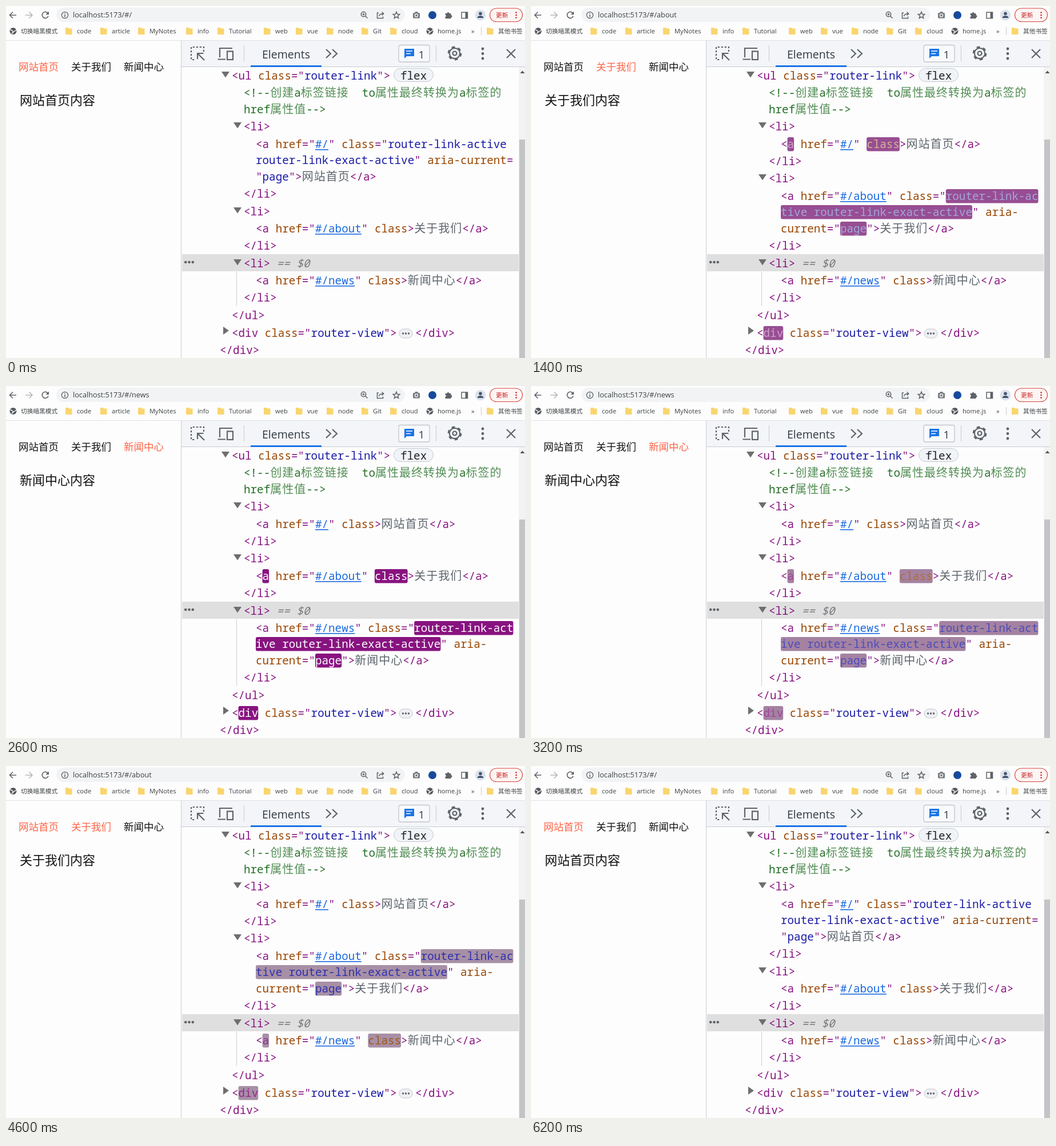
An HTML page that plays this animation: 908 by 617 pixels, repeating every 6.6 s.

```html
<!DOCTYPE html>
<html lang="zh-CN">
<head>
<meta charset="utf-8">
<title>Router links</title>
<style>
  html, body { margin: 0; width: 100%; height: 100%; overflow: hidden; background: #fdfdfd; }
  svg { display: block; width: 908px; height: 617px; }
  text { white-space: pre; }
  .ui { font: 11.2px "Open Sans", "Noto Sans", sans-serif; fill: #3c4043; }
  .cjk { font-family: "Noto Sans CJK SC", "Noto Sans CJK", sans-serif; }
  .code { font: 19.25px "Noto Sans Mono", "DejaVu Sans Mono", monospace; }
  .code .cjk { font-family: "Noto Sans CJK SC", "Noto Sans CJK", sans-serif; font-size: 20px; font-weight: 300; letter-spacing: 1px; fill-opacity: .78; }
  .line { fill: none; stroke: #5f6368; stroke-width: 1.6; }
</style>
</head>
<body>
<svg id="stage" viewBox="0 0 908 617">
  <rect width="908" height="617" fill="#fdfdfd"/>

  <!-- browser bar -->
  <rect x="88" y="3" width="610" height="25" rx="12.5" fill="#f1f3f4"/>
  <path class="line" d="M18 16H7M12 10.5L6.500 16L12 21.500"/>
  <path class="line" stroke-opacity=".45" d="M34 16H46M40.500 10.500L46 16L40.500 21.500"/>
  <path class="line" d="M73.500 13A5.500 5.500 0 1 0 74 17.500"/>
  <path fill="#5f6368" d="M75 9.500V15H69.500Z"/>
  <circle class="line" cx="103" cy="16" r="5.600" style="stroke-width:1.300"/>
  <path class="line" d="M103 15V19.500M103 12.300V13.700" style="stroke-width:1.500"/>
  <g class="line" style="stroke-width:1.500">
    <circle cx="625.500" cy="14.500" r="4.200"/>
    <path d="M628.500 17.500L632.500 21.500M623.500 14.500H627.500M625.500 12.500V16.500"/>
    <path d="M652 12H649.500V21.500H659.500V18.500M652.500 18C653 14.500 656 13.500 660 13.500M657.500 10.500L660.800 13.500L657.500 16.500"/>
    <path d="M683 10.200L684.600 14.200L688.800 14.500L685.600 17.200L686.600 21.400L683 19.100L679.400 21.400L680.400 17.200L677.200 14.500L681.400 14.200Z"/>
    <rect x="797" y="11" width="10.500" height="10.500"/>
  </g>
  <rect x="712" y="12" width="12" height="9.500" rx="1.500" fill="#777b80"/>
  <path d="M715 12L716 10H720L721 12Z" fill="#777b80"/>
  <circle cx="718" cy="16.500" r="2.600" fill="#777b80" stroke="#fff" stroke-width="1.200"/>
  <circle cx="746" cy="16" r="7" fill="#174a9c"/>
  <path fill="#5f6368" d="M768.500 13H771.500A2 2 0 1 1 775.500 13H778.500V16A2 2 0 1 1 778.500 20V22H768.500V19A1.800 1.800 0 0 0 768.500 15.500Z"/>
  <rect x="803.500" y="11" width="4" height="10.500" fill="#5f6368"/>
  <circle cx="830" cy="16" r="9.500" fill="#dde3ec"/>
  <circle cx="830" cy="13.300" r="2.800" fill="#45566e"/>
  <path d="M824.500 21Q825 17 830 17T835.500 21Z" fill="#45566e"/>
  <rect x="846.500" y="4" width="57" height="23.500" rx="11.800" fill="#fdf5f4" stroke="#d8453b" stroke-width="1.200"/>
  <text x="857" y="20" class="cjk" font-size="10.700" fill="#c5221f">更新</text>
  <g fill="#c5221f"><circle cx="892.500" cy="11.500" r="1.300"/><circle cx="892.500" cy="16" r="1.300"/><circle cx="892.500" cy="20.500" r="1.300"/></g>
  <g id="url" class="ui" style="font-size:12.700px"></g>

  <!-- bookmarks -->
  <g id="marks" class="ui"></g>
  <path d="M831.500 37V51" stroke="#c9ccd0"/>
  <path d="M0 60.500H908" stroke="#dfe1e4"/>

  <!-- page -->
  <g id="page" class="cjk"></g>

  <!-- inspector bar -->
  <rect x="307" y="61" width="601" height="45" fill="#f3f5f8"/>
  <path d="M306.500 61V617M307 106.500H908" stroke="#c9ccd0"/>
  <g class="line" style="stroke-width:2.200">
    <path d="M346 80V72H324V94H332" stroke-dasharray="3.300 2.700"/>
    <path d="M347 95L336 84M335 93V83H345.500"/>
    <path d="M374 90V74H396M370.500 93.500H384"/>
    <rect x="387" y="79.500" width="10" height="14.500"/>
    <path d="M560 76L568 83.500L560 91M571 76L579 83.500L571 91"/>
    <path d="M876 76L891 91M891 76L876 91"/>
    <circle cx="785" cy="83" r="9.200"/>
    <circle cx="785" cy="83" r="11" stroke-dasharray="5.760" style="stroke-width:2.800"/>
    <circle cx="785" cy="83" r="3.500"/>
  </g>
  <path d="M416.500 69V97M752.500 69V97" stroke="#c9ccd0"/>
  <text x="448" y="92" class="ui" style="font-size:19.500px;fill:#303942">Elements</text>
  <rect x="428" y="104" width="124" height="3" fill="#1a73e8"/>
  <rect x="687" y="68.500" width="54" height="29.500" rx="3" fill="#f8f9fb" stroke="#c3c6ca" stroke-width="1.300"/>
  <path d="M697 75H714V88H701L697 92Z" fill="#1a73e8"/>
  <path d="M700 79H711M700 83.500H708" stroke="#fff" stroke-width="1.600"/>
  <text x="721.500" y="92" class="ui" style="font-size:19px;fill:#303942">1</text>
  <g fill="#5f6368"><circle cx="834" cy="75" r="2.400"/><circle cx="834" cy="83.500" r="2.400"/><circle cx="834" cy="92" r="2.400"/></g>

  <!-- inspector tree -->
  <rect x="897" y="107" width="11" height="510" fill="#f3f3f4"/>
  <rect x="898" y="234" width="10" height="383" fill="#c3c4c6"/>
  <path d="M899.500 118L903.500 113.500L907.500 118Z" fill="#555"/>
  <rect x="678.500" y="109.500" width="69" height="23" rx="11.500" fill="#f0f3f7" stroke="#c5c9ce"/>
  <g id="tree" class="code"></g>
</svg>
<script>
const LOOP = 6600, EASE = 'cubic-bezier(0,0,.2,1)';
const $ = id => document.getElementById(id);
const RED = '#ff6347', BLACK = '#111';
const INK = { t: '#881280', n: '#994500', v: '#1a1aa6', l: '#1a6ae0', c: '#236e25', x: '#303942', g: '#77797c', k: '#202124' };
const CHAR = 11.55, HAN = 21, NODE = 30.35, WRAP = 28.6;

function add(parent, tag, attrs, text = '') {
  const el = document.createElementNS('http://www.w3.org/2000/svg', tag);
  for (const k in attrs) el.setAttribute(k, attrs[k]);
  el.textContent = text;
  parent.append(el);
  return el;
}

const play = (el, frames) => el.animate(frames, { duration: LOOP, iterations: Infinity });

// Hard changes: list of [time, value]
function steps(el, prop, list) {
  const frames = list.map(([t, v]) => ({ offset: t / LOOP, [prop]: v, easing: 'step-end' }));
  play(el, [...frames, { offset: 1, [prop]: list[list.length - 1][1] }]);
}

function flash(el, start, from, to, mid) {
  const at = (t, fill, easing = 'linear') => ({ offset: t / LOOP, fill, easing });
  const frames = [at(0, to, 'step-end'), at(start, from, EASE)];
  if (mid) frames.push(at(start + 1120, mid, EASE));
  play(el, [...frames, at(start + 1400, to), at(LOOP, to)]);
}

// Tokens are split by "~": kind letter, optional "!" for a flashing part, text
function row(g, x, top, tokens, start) {
  const y = Math.round(top);
  for (const token of tokens.split('~')) {
    const kind = token[0], hot = token[1] === '!', body = token.slice(hot ? 2 : 1);
    const fill = INK[kind];
    if (hot) {
      const box = add(g, 'rect', { x, y: y - 12, width: body.length * CHAR, height: 24.5, rx: 3, fill: 'transparent' });
      flash(box, start, '#881280', 'rgba(168,148,166,0)', '#a894a6');
    }
    for (const part of body.match(/[\u4e00-\u9fff]+|[^\u4e00-\u9fff]+/g)) {
      const han = part > '\u4e00', w = part.length * (han ? HAN : CHAR);
      const el = add(g, 'text', { x, y: y + 7, fill, class: han ? 'cjk' : '' }, part);
      if (kind === 'g') el.setAttribute('font-style', 'italic');
      if (kind === 'l') add(g, 'rect', { x, y: y + 9, width: w, height: 1.6, fill });
      if (hot) flash(el, start, '#fff', fill);
      x += w;
    }
  }
}

const arrow = (g, x, y) => add(g, 'path', { d: `M${x - 7} ${y - 5}h14l-7 10.500z`, fill: '#6e6e6e' });
const dots = (g, x, y, gap, r, fill) => [-1, 0, 1].forEach(i => add(g, 'circle', { cx: x + i * gap, cy: y, r, fill }));

const LINKS = [
  { name: '网站首页', path: '#/', cut: 18 },
  { name: '关于我们', path: '#/about', cut: 14 },
  { name: '新闻中心', path: '#/news', cut: 15 }
];

function anchor({ name, path, cut }, active, hot) {
  const f = hot ? '!' : '', head = `t<~t${f}a~n href~t="~l${path}~t" `;
  const tail = `~t>~x${name}~t</a>`;
  if (!active) return [`${head}~n${f}class${tail}`];
  const value = 'router-link-active router-link-exact-active';
  const [a, b] = cut === 18 ? ['naria-current~t=', 't"'] : ['naria-', 'ncurrent~t="'];
  return [
    `${head}~nclass~t="~v!${value.slice(0, cut)}`,
    `v!${value.slice(cut).trim()}~t" ~${a}`,
    `${b}~v!page~t"${tail}`
  ];
}

function scene(active, previous, start) {
  const g = add($('tree'), 'g', {});
  let y = 211.4;
  LINKS.forEach((link, i) => {
    const mid = Math.round(y);
    if (i === 2) {
      add(g, 'rect', { x: 308, y: mid - 16, width: 589, height: 30, fill: '#dfdfe0' });
      add(g, 'rect', { x: 403, y: mid + 15, width: 1, height: 511 - mid, fill: '#cfcfd2' });
      dots(g, 320.5, mid - 2, 6.3, 2.3, '#5f6368');
    }
    arrow(g, 405, mid - 2);
    row(g, 416, y, i === 2 ? 't<li>~g == $0' : 't<li>');
    y += NODE;
    anchor(link, i === active, i === previous).forEach((line, n) => {
      if (n) y += WRAP;
      row(g, 437, y, line, start);
    });
    y += NODE;
    row(g, 416, y, 't</li>');
    y += NODE;
  });
  row(g, 395, 573, 't<~t!div~n class~t="~vrouter-view~t">', start);
  return g;
}

// Fixed tree rows
const tree = $('tree');
arrow(tree, 384, 120);
row(tree, 395, 122, 't<ul~n class~t="~vrouter-link~t">');
row(tree, 690, 122, 'kflex');
row(tree, 416, 152, 'c<!--创建a标签链接  to属性最终转换为a标签的');
row(tree, 416, 180.5, 'chref属性值-->');
row(tree, 395, 542, 't</ul>');
row(tree, 716, 573, 't</div>');
row(tree, 374, 603, 't</div>');
add(tree, 'path', { d: 'M380 562v14l10-7z', fill: '#6e6e6e' });
add(tree, 'rect', { x: 688, y: 566, width: 23, height: 16, rx: 8, fill: '#eef0f3', stroke: '#c5c9ce' });
dots(tree, 699.5, 574, 5, 1.7, '#5f6368');

// Active link, previous link, flash start, shown from, shown until
[[1, 0, 1200, 1200, 2600], [2, 1, 2600, 2600, 3800], [1, 2, 3750, 3800, 4800]].forEach(([a, p, start, from, until]) =>
  steps(scene(a, p, start), 'visibility', [[0, 'hidden'], [from, 'visible'], [until, 'hidden']]));
steps(scene(0, 1, 4800), 'visibility', [[0, 'visible'], [1200, 'hidden'], [4800, 'visible']]);

// Address and page content follow the route
function route(parts, news, about) {
  const [home, mid, last] = parts;
  steps(home, 'opacity', [[0, 1], [1200, 0], [4800, 1]]);
  steps(mid, 'opacity', [[0, 0], [1200, 1], [news, 0], [about, 1], [4800, 0]]);
  steps(last, 'opacity', [[0, 0], [news, 1], [about, 0]]);
}
route(LINKS.map(l => add($('url'), 'text', { x: 117, y: 20 }, 'localhost:5173/' + l.path)), 2600, 3800);
route(LINKS.map(l => add($('page'), 'text', { x: 24, y: 173, 'font-size': 22, fill: BLACK }, l.name + '内容')), 2500, 3700);

const NAV = [
  [[0, RED], [1200, BLACK], [4400, RED]],
  [[0, BLACK], [800, RED], [2500, BLACK], [3300, RED], [4800, BLACK]],
  [[0, BLACK], [2000, RED], [3700, BLACK]]
];
LINKS.forEach((l, i) =>
  steps(add($('page'), 'text', { x: 22 + 92 * i, y: 112.5, 'font-size': 17.5 }, l.name), 'fill', NAV[i]));

// Bookmarks
const marks = $('marks');
const FOLDERS = { code: 104, article: 165, MyNotes: 231, info: 315, Tutorial: 370, web: 451, vue: 507, node: 561, Git: 622, cloud: 672, 其他书签: 841 };
const label = (x, s) => add(marks, 'text', s > '\u4e00' ? { x, y: 48, class: 'cjk', 'font-size': 10.7 } : { x, y: 48 }, s);
for (const [name, x] of Object.entries(FOLDERS)) {
  add(marks, 'path', { d: `M${x} 38h5l1.500 1.500h5v10.500h-11.500z`, fill: '#f9d56e' });
  label(x + 20, name);
}
for (const [name, x] of [['切换暗黑模式', 12.5], ['home.js', 741.5]]) {
  add(marks, 'circle', { cx: x, cy: 44, r: 6, fill: '#55595e' });
  add(marks, 'path', { d: `M${x - 5} 42q3 0 4 2t4 0t2-3M${x - 2} 49q0-3 3-3`, fill: 'none', stroke: '#fff', 'stroke-width': 1.3 });
  label(x + 13.5, name);
}
label(814, '»');
</script>
</body>
</html>
```
